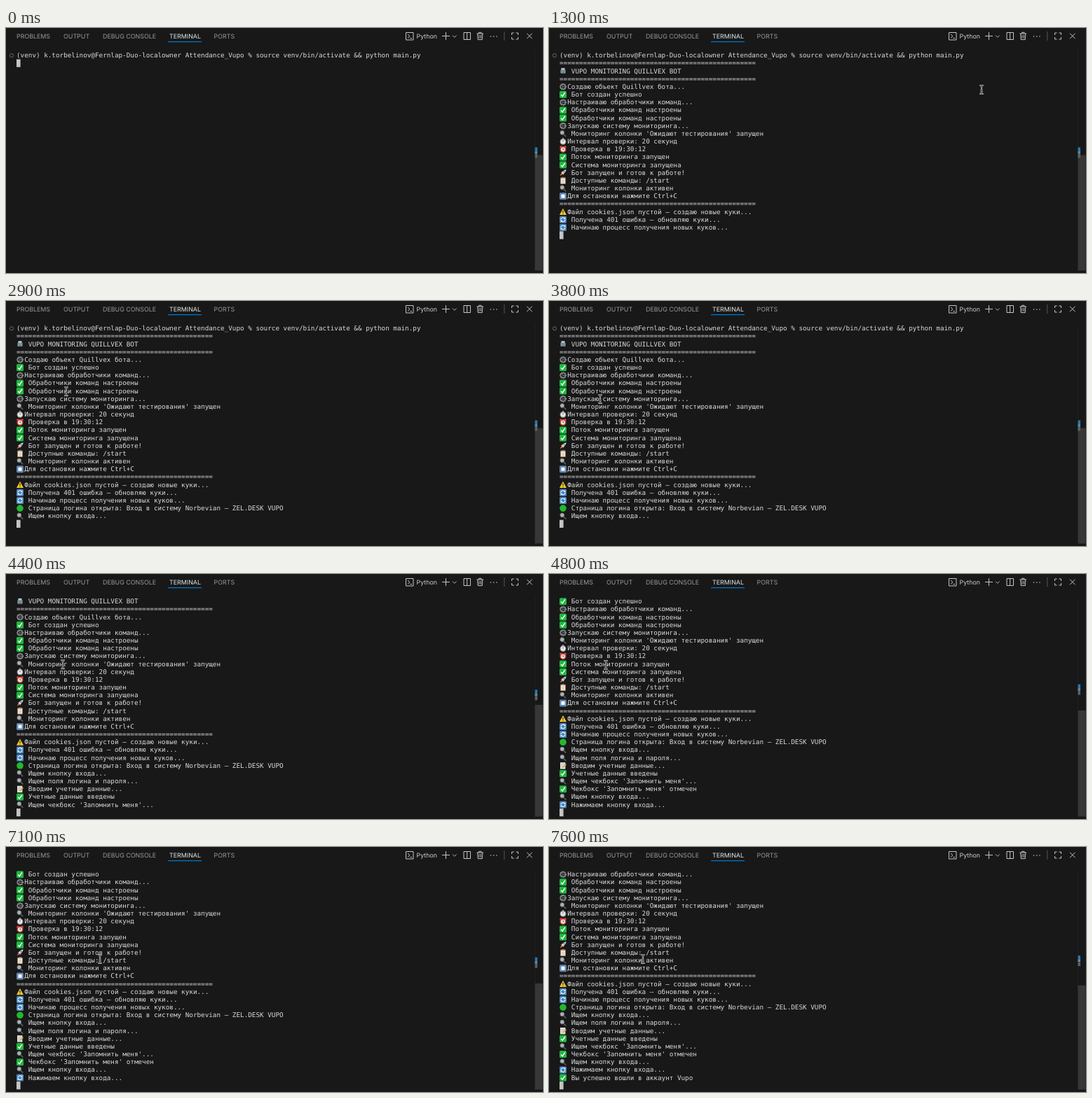
An HTML page with a canvas that plays this animation: 766x350 px, repeating every 8000 ms.

```html
<!DOCTYPE html>
<html lang="ru">
<head>
<meta charset="utf-8">
<title>Terminal</title>
<style>
  html, body { margin: 0; width: 100%; height: 100%; overflow: hidden; background: #181818; }
  canvas { display: block; }
</style>
</head>
<body>
<canvas id="stage" width="766" height="350"></canvas>
<script>
const ctx = document.getElementById('stage').getContext('2d');
const LOOP = 8000, STEP = 100;
const LEFT = 15, TOP = 39, CELL = 5.6, PITCH = 11.17, LAST_ROW = 27;
const MONO = '9.3px "DejaVu Sans Mono", monospace';
const SANS = '8.9px Inter, sans-serif';
const RULE = '='.repeat(50);

// Each line: [icon, text]; text after an icon starts at column 2.
const lines = [
  ['', '(venv) k.torbelinov@Fernlap-Duo-localowner Attendance_Vupo % source venv/bin/activate && python main.py'],
  ['', RULE],
  ['robot', ' VUPO MONITORING QUILLVEX BOT'],
  ['', RULE],
  ['gear', 'Создаю объект Quillvex бота...'],
  ['check', ' Бот создан успешно'],
  ['gear', 'Настраиваю обработчики команд...'],
  ['check', ' Обработчики команд настроены'],
  ['check', ' Обработчики команд настроены'],
  ['gear', 'Запускаю систему мониторинга...'],
  ['lens', " Мониторинг колонки 'Ожидают тестирования' запущен"],
  ['timer', 'Интервал проверки: 20 секунд'],
  ['alarm', ' Проверка в 19:30:12'],
  ['check', ' Поток мониторинга запущен'],
  ['check', ' Система мониторинга запущена'],
  ['rocket', ' Бот запущен и готов к работе!'],
  ['board', ' Доступные команды: /start'],
  ['lens', ' Мониторинг колонки активен'],
  ['stop', 'Для остановки нажмите Ctrl+C'],
  ['', RULE],
  ['warn', 'Файл cookies.json пустой – создаю новые куки...'],
  ['sync', ' Получена 401 ошибка – обновляю куки...'],
  ['sync', ' Начинаю процесс получения новых куков...'],
  ['dot', ' Страница логина открыта: Вход в систему Norbevian – ZEL.DESK VUPO'],
  ['lens', ' Ищем кнопку входа...'],
  ['lens', ' Ищем поля логина и пароля...'],
  ['memo', ' Вводим учетные данные...'],
  ['check', ' Учетные данные введены'],
  ['lens', " Ищем чекбокс 'Запомнить меня'..."],
  ['check', " Чекбокс 'Запомнить меня' отмечен"],
  ['lens', ' Ищем кнопку входа...'],
  ['sync', ' Нажимаем кнопку входа...'],
  ['check', ' Вы успешно вошли в аккаунт Vupo']
];

// [time, number of printed lines]
const output = [
  [0, 1], [100, 20], [200, 23], [1900, 24], [2000, 25], [4200, 26],
  [4300, 28], [4400, 29], [4600, 30], [4700, 31], [4800, 32], [7400, 33]
];

// [time, x, y] of the pointer
const pointer = [
  [1300, 617, 88], [1500, 265, 88], [1600, 190, 132], [1700, 164, 165],
  [1800, 164, 165], [2100, 114, 97], [2400, 114, 96], [3200, 69, 149],
  [3700, 69, 149], [3800, 73, 140], [3900, 80, 132], [4300, 81, 129],
  [4900, 81, 130], [5100, 115, 145], [5200, 127, 158], [5500, 127, 158],
  [5600, 134, 160], [LOOP, 134, 160]
];

function fill(color, path) {
  ctx.fillStyle = color;
  ctx.fill(new Path2D(path));
}

function line(color, width, path) {
  ctx.strokeStyle = color;
  ctx.lineWidth = width;
  ctx.stroke(new Path2D(path));
}

function rect(color, x, y, w, h) {
  ctx.fillStyle = color;
  ctx.fillRect(x, y, w, h);
}

function box(color, x, y, w, h, r) {
  ctx.fillStyle = color;
  ctx.beginPath();
  ctx.roundRect(x, y, w, h, r);
  ctx.fill();
}

function disc(color, x, y, r) {
  ctx.fillStyle = color;
  ctx.beginPath();
  ctx.arc(x, y, r, 0, 7);
  ctx.fill();
}

function ring(color, x, y, r, width) {
  ctx.strokeStyle = color;
  ctx.lineWidth = width;
  ctx.beginPath();
  ctx.arc(x, y, r, 0, 7);
  ctx.stroke();
}

function text(str, x, y, font, color) {
  ctx.font = font;
  ctx.fillStyle = color;
  ctx.fillText(str, x, y);
}

const icons = {
  robot() {
    box('#8fa3a8', -3.5, -2.5, 7, 6, 1.5);
    rect('#c8d3d6', -2.5, -4.3, 5, 2);
    rect('#3d6f78', -2.3, -1, 1.6, 1.6);
    rect('#3d6f78', 0.7, -1, 1.6, 1.6);
    rect('#4a4f52', -2, 1.8, 4, 1);
  },
  gear() {
    ctx.setLineDash([1.4, 1.1]);
    ring('#8c9094', 0, 0, 4.3, 1.4);
    ctx.setLineDash([]);
    ring('#8c9094', 0, 0, 3.3, 1.2);
    line('#8c9094', 0.8, 'M0 0L3 0M0 0L-1.5 -2.6M0 0L-1.5 2.6');
  },
  check() {
    box('#1fb83f', -5, -5, 10, 10, 1.5);
    line('#fff', 1.5, 'M-2.8 0.4L-0.8 2.6L2.8 -2.8');
  },
  lens() {
    line('#5a5a5c', 1.7, 'M1 1L4.2 4.2');
    disc('#a9b4b8', -1.2, -1.4, 2.8);
    ring('#77797b', -1.2, -1.4, 2.9, 0.9);
  },
  timer() {
    rect('#9a9a9a', -1, -5.2, 2, 1.6);
    disc('#9c9c9c', 0, 0.3, 4.4);
    disc('#e8e8e8', 0, 0.3, 3.2);
    line('#444', 0.8, 'M0 0.5L0 -1.8');
  },
  alarm() {
    disc('#d8433a', -3, -3.2, 1.8);
    disc('#d8433a', 3, -3.2, 1.8);
    disc('#d8433a', 0, 0.3, 4.5);
    disc('#efe9e6', 0, 0.3, 3);
    line('#333', 0.8, 'M0 -1.6L0 0.5L1.5 0.5');
  },
  rocket() {
    fill('#c9432f', 'M-3.6 -0.6L-0.6 -2L-1.4 1ZM0.6 3.8L2 0.6L-1 1.4Z');
    fill('#cfd5da', 'M4.6 -4.6Q0.5 -4.2 -2.4 0.6L-0.6 2.4Q4.2 -0.5 4.6 -4.6Z');
    disc('#4579a8', 1.5, -1.5, 1.1);
    fill('#e8a13a', 'M-2.4 1L-1 2.4L-4.4 4.4Z');
  },
  board() {
    box('#a5713f', -4, -4.4, 8, 9.4, 1);
    rect('#ecebe7', -3, -3.2, 6, 7.4);
    rect('#8d9296', -1.7, -5, 3.4, 2);
    line('#aaa', 0.6, 'M-2 -0.8H2M-2 0.9H2M-2 2.6H2');
  },
  stop() {
    box('#5f86b0', -5, -5, 10, 10, 1.5);
    rect('#f2f5f8', -2.6, -2.6, 5.2, 5.2);
  },
  warn() {
    fill('#f6c62c', 'M0 -4.8L5 4.4H-5Z');
    line('#222', 1.1, 'M0 -1.8V1.5M0 2.4V3.5');
  },
  sync() {
    box('#4785be', -5, -5, 10, 10, 1.5);
    line('#f3f7fb', 1.1, 'M-3 0A3 3 0 0 1 2 -2.2M3 0A3 3 0 0 1 -2 2.2');
    fill('#f3f7fb', 'M3.4 -3.4V-0.6L0.6 -1.4ZM-3.4 3.4V0.6L-0.6 1.4Z');
  },
  dot() {
    disc('#22b92c', 0, 0, 4.8);
  },
  memo() {
    rect('#e6e6e2', -4, -4.6, 7.4, 9.4);
    line('#a5a5a5', 0.6, 'M-3 -2.6H2.4M-3 -0.8H2.4M-3 1H1M-3 2.8H0');
    line('#e6a52e', 1.6, 'M4.4 -2L0.2 2.6');
  }
};

function drawHeader() {
  const tabs = [['PROBLEMS', 15], ['OUTPUT', 82], ['DEBUG CONSOLE', 138], ['TERMINAL', 233], ['PORTS', 296.5]];
  for (const [name, x] of tabs)
    text(name, x, 14.7, SANS, name === 'TERMINAL' ? '#e7e7e7' : '#9a9a9a');
  rect('#0078d4', 231, 19, 48, 1.2);
  text('Python', 585.5, 15, SANS, '#cccccc');

  const gray = '#c5c5c5';
  line(gray, 1, 'M570.5 6.5H581V17H570.5ZM573 9L576 11.7L573 14.4M576.5 14.6H579');
  line(gray, 1, 'M622 11.5H633M627.5 6V17');
  line(gray, 0.9, 'M637 10.5L639.8 13.3L642.6 10.5');
  line(gray, 1, 'M653 6.5H662.5V16.5H653ZM657.7 6.5V16.5');
  line(gray, 1, 'M671.5 8H681M674.5 8V6.3H678V8M672.7 8L673.2 16.6H679.3L679.8 8M675 10V14.8M677.5 10V14.8');
  for (const x of [691.5, 695.7, 699.9]) disc(gray, x, 12, 0.8);
  rect('#555555', 710.3, 5, 1, 13);
  line(gray, 1, 'M724.5 7H721.5V10M727.5 7H730.5V10M724.5 16H721.5V13M727.5 16H730.5V13');
  line(gray, 1, 'M743 7.7L750.5 15.2M750.5 7.7L743 15.2');
}

function drawScrollbar(scroll) {
  const top = 181.5 + 2.7 * scroll, mark = 170.5 - 2.7 * scroll / 1.05;
  rect('#1f1f1f', 754, 32, 1, 315);
  rect('#373737', 754.5, top, 11, 346.5 - top);
  rect('#2279b8', 754.5, mark, 3.5, 9);
  rect('#6b8796', 754.5, mark + 6, 3.5, 3);
  rect('#5a6168', 754.5, mark + 9.5, 3.5, 5.5);
}

function drawTerminal(count) {
  const scroll = Math.max(0, count - LAST_ROW);
  const rowY = i => TOP + PITCH * (i - scroll);
  for (let i = scroll; i < count; i++) {
    const [icon, str] = lines[i], y = rowY(i);
    if (icon) {
      ctx.save();
      ctx.translate(LEFT + 5, y + 0.2);
      icons[icon]();
      ctx.restore();
    }
    text(str, LEFT + (icon ? 2 * CELL : 0), y + 3.2, MONO, '#dadada');
  }
  if (!scroll) ring('#707070', 8, TOP + 0.3, 2.6, 0.9);
  rect('#c4c4c4', LEFT, rowY(count) - 5.5, CELL, PITCH);
  drawScrollbar(scroll);
}

function drawPointer(t) {
  const next = pointer.findIndex(p => p[0] > t);
  if (next < 1) return;
  const [t0, x0, y0] = pointer[next - 1], [t1, x1, y1] = pointer[next];
  const k = (t - t0) / (t1 - t0);
  const beam = 'M-2.8 -6Q0 -6 0 -4Q0 -6 2.8 -6M0 -4V4M-2.8 6Q0 6 0 4Q0 6 2.8 6M-1.6 1.6H1.6';
  ctx.save();
  ctx.translate(x0 + (x1 - x0) * k, y0 + (y1 - y0) * k);
  line('#d0d0d0', 2.2, beam);
  line('#202020', 0.8, beam);
  ctx.restore();
}

function draw(time) {
  const t = Math.floor((time % LOOP) / STEP) * STEP;
  const count = output.filter(o => o[0] <= t).pop()[1];
  rect('#181818', 0, 0, 766, 350);
  drawHeader();
  drawTerminal(count);
  drawPointer(t);
}

ctx.textRendering = 'geometricPrecision';
const start = performance.now();
function tick() {
  draw(performance.now() - start);
  requestAnimationFrame(tick);
}
tick();
</script>
</body>
</html>
```
